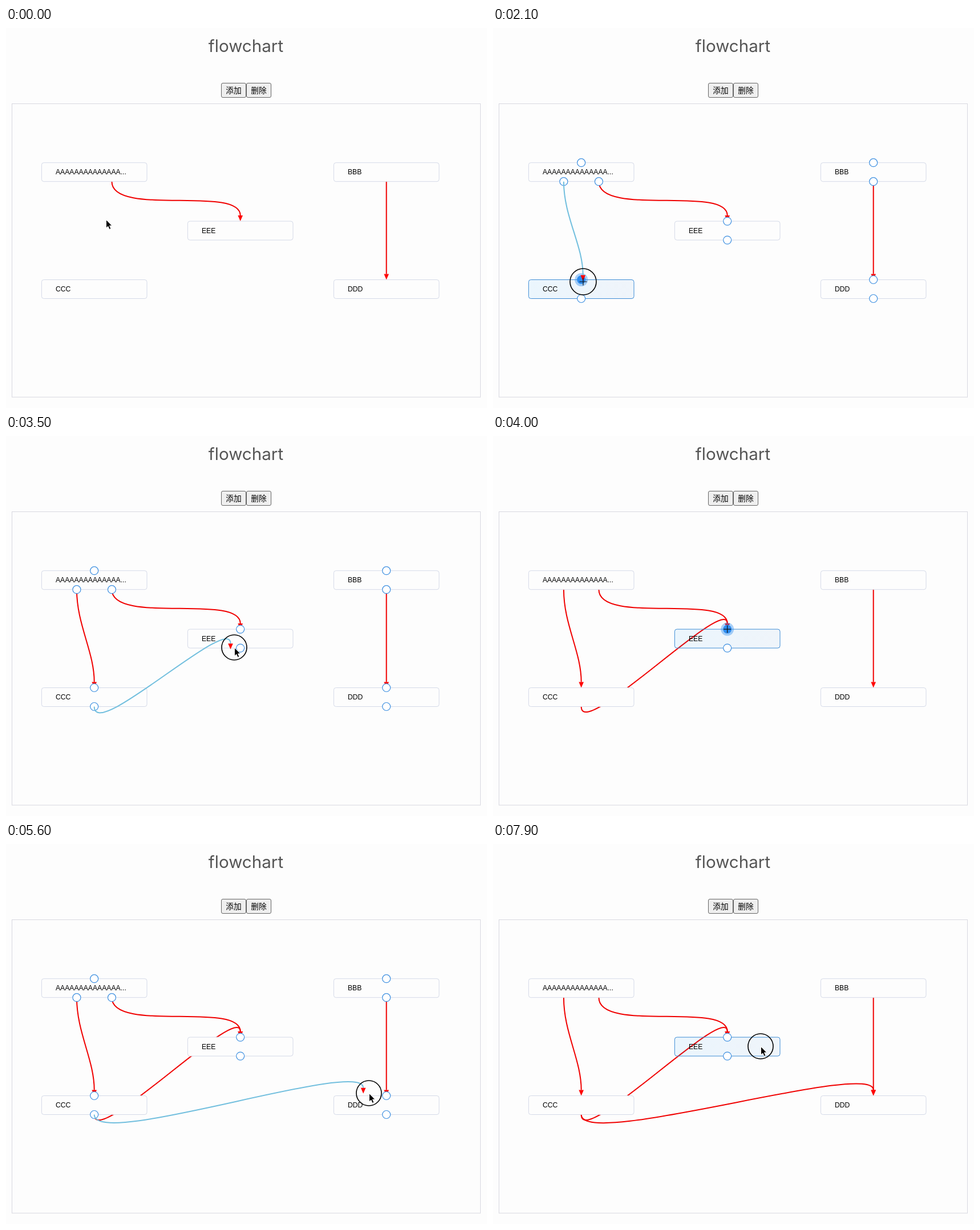
Animation of 843 by 665 pixels, one loop 8 s. Source, as an HTML page:

```html
<!DOCTYPE html>
<html lang="zh">
<head>
<meta charset="utf-8">
<title>flowchart</title>
<style>
  html, body { margin: 0; width: 100%; height: 100%; overflow: hidden; background: #fdfdfd; }
  svg { display: block; font: 12.2px "Liberation Sans", Arial, sans-serif; }
  .title { font: 29.6px Inter, sans-serif; fill: #555; text-anchor: middle; }
  .button rect { fill: #efefef; stroke: #666; }
  .button text { font: 500 13.7px "Noto Sans CJK SC", "Noto Sans CJK", sans-serif; text-anchor: middle; }
  .frame { fill: none; stroke: #d8d8e0; }
  .node { fill: #fdfdfd; stroke: #d5dae8; }
  .node.hover { fill: url(#tint); stroke: #3f8dd6; }
  .port { fill: #fff; stroke: #3d8fe0; stroke-width: 1.2; }
  .halo { fill: #2d8cf0; fill-opacity: .4; }
  .hot { fill: #2d8cf0; }
  .line { fill: none; stroke: #f00000; stroke-width: 2; }
  .drag { stroke: #72bfde; }
  .arrow { fill: #f00; }
  .press { fill: none; stroke: #000; stroke-width: 1.6; }
  .cross { fill: none; stroke: #111; stroke-width: 1.2; }
  .pointer { fill: #000; stroke: #fff; stroke-width: 1; }
</style>
</head>
<body>
<svg width="843" height="665" viewBox="0 0 843 665">
  <defs>
    <linearGradient id="tint">
      <stop offset="0" stop-color="#18a0ff" stop-opacity=".08"/>
      <stop offset="1" stop-color="#1870d0" stop-opacity=".06"/>
    </linearGradient>
  </defs>
  <text class="title" x="420.5" y="42">flowchart</text>
  <g class="button"><rect x="377.5" y="96.5" width="43" height="25" rx="2.5"/><text x="399" y="114">添加</text></g>
  <g class="button"><rect x="421.5" y="96.5" width="43" height="25" rx="2.5"/><text x="443" y="114">删除</text></g>
  <rect class="frame" x="10.5" y="132.5" width="821" height="513.5"/>
  <g id="scene"></g>
</svg>
<script>
const LOOP = 8000, STEP = 100, W = 184.6, H = 33;
const scene = document.getElementById('scene');

// Nodes sit on a coarse grid
const makeNode = (label, col, row, outs = [1 / 2]) => {
  const x = 62.4 + 256 * col, y = 235.7 + 102.4 * row;
  return { label, x, y, top: [x + W / 2, y], outs: outs.map(f => [x + W * f, y + H]) };
};
const A = makeNode('AAAAAAAAAAAAAA...', 0, 0, [1 / 3, 2 / 3]);
const B = makeNode('BBB', 2, 0);
const C = makeNode('CCC', 0, 2);
const D = makeNode('DDD', 2, 2);
const E = makeNode('EEE', 1, 1);
const nodes = [A, B, C, D, E];
const portsOf = n => [n.top, ...n.outs];

const fixedEdges = [[A.outs[1], E.top], [B.outs[0], D.top]];
const drags = [
  { start: 1000, end: 2300, from: A.outs[0], to: C.top },
  { start: 2700, end: 4000, from: C.outs[0], to: E.top },
  { start: 4900, end: 6400, from: C.outs[0], to: D.top }
];
const lastPress = 7900;

// Mouse moves: start, end, destination
const home = [175, 335];
const moves = [
  [0, 800, A.outs[0]], [1000, 2100, [158, 444]], [2300, 2600, [157, 471]],
  [2700, 2900, [166, 484]], [2900, 3500, [400, 370]], [3500, 3900, E.top],
  [4000, 4600, [157, 466]], [4700, 4900, C.outs[0]],
  [4900, 5600, [636, 436]], [5600, 6200, [664.5, 443.5]], [7200, 7800, [469, 354]]
];
const easeOut = u => 1 - (1 - u) ** 2;

function mouseAt(t) {
  let pos = home;
  for (const [start, end, to] of moves) {
    if (t <= start) break;
    const f = easeOut(Math.min(1, (t - start) / (end - start)));
    pos = pos.map((v, i) => v + (to[i] - v) * f);
  }
  return pos;
}

const near = ([x, y], [px, py]) => Math.hypot(x - px, y - py) < 7.5;
const inside = ([x, y], n) => x >= n.x && x <= n.x + W && y >= n.y && y <= n.y + H;

function drawEdge([x0, y0], [x1, y1], kind = '') {
  const end = y1 - 10;
  return `<path class="line ${kind}" d="M${x0} ${y0}C${x0} ${y0 + 62} ${x1} ${end - 53} ${x1} ${end}"/>` +
    `<path class="arrow" d="M${x1} ${y1}l-4.3 -10h8.6z"/>`;
}

const drawNode = (n, hover) =>
  `<rect class="node ${hover ? 'hover' : ''}" x="${n.x}" y="${n.y}" width="${W}" height="${H}" rx="4"/>` +
  `<text x="${n.x + 24.5}" y="${n.y + 20.5}">${n.label}</text>`;

const circle = (kind, [x, y], r) => `<circle class="${kind}" cx="${x}" cy="${y}" r="${r}"/>`;

const drawPort = (p, hot) =>
  hot ? circle('halo', p, 11.5) + circle('hot', p, 7.5) : circle('port', p, 7);

function drawMouse([x, y], pressed, cross) {
  const shape = cross
    ? '<path class="cross" d="M-6.5 0h13M0 -6.5v13"/>'
    : '<path class="pointer" d="M.5 .5V15L3.8 12L6.2 17.4L8.9 16.2L6.5 11H10.8Z"/>';
  return (pressed ? circle('press', [x, y], cross ? 23 : 22) : '') +
    `<g transform="translate(${x} ${y})">${shape}</g>`;
}

function render(t) {
  const mouse = mouseAt(t), seen = mouseAt(t - STEP); // the page reacts one step late
  const drag = drags.find(d => t >= d.start && t < d.end);
  const edges = [...fixedEdges, ...drags.filter(d => t >= d.end).map(d => [d.from, d.to])];
  const hotPort = nodes.flatMap(portsOf).find(p => near(seen, p));
  const hovered = nodes.find(n => inside(seen, n) || portsOf(n).includes(hotPort));
  const shown = drag ? nodes : nodes.filter(n => n === hovered);

  scene.innerHTML =
    edges.map(e => drawEdge(...e)).join('') +
    nodes.map(n => drawNode(n, n === hovered)).join('') +
    shown.flatMap(portsOf).map(p => drawPort(p, p === hotPort)).join('') +
    (drag ? drawEdge(drag.from, seen, 'drag') : '') +
    drawMouse(mouse, drag || t >= lastPress, hotPort);
}

const begin = performance.now();
let last = -1;
function tick() {
  const t = Math.floor((performance.now() - begin) % LOOP / STEP) * STEP;
  if (t !== last) render(last = t);
  requestAnimationFrame(tick);
}
tick();
</script>
</body>
</html>
```
